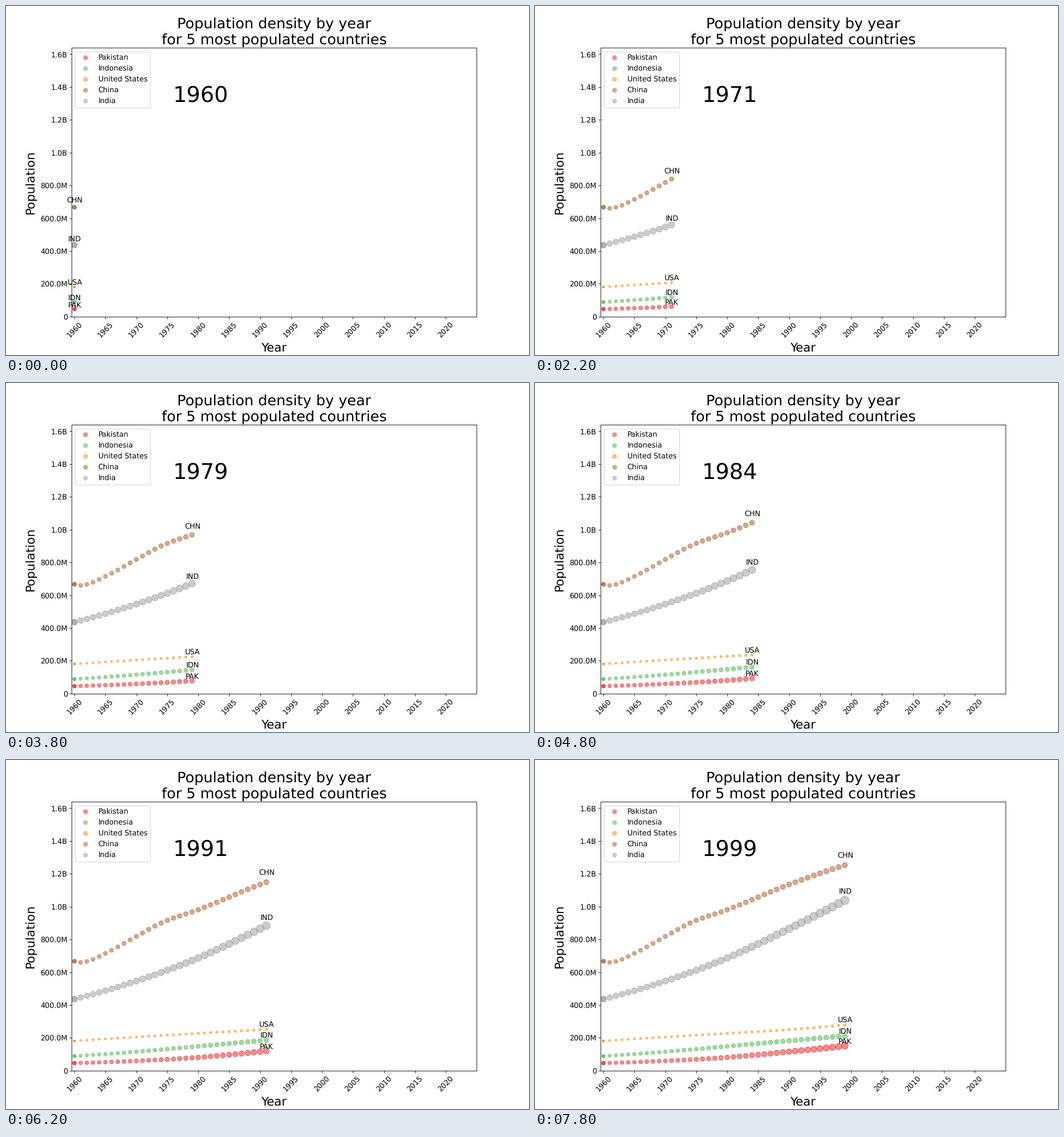
Recreate the animation shown at these times as a matplotlib script. Size 917 by 611 pixels, loop 8 s.

```python
import matplotlib.pyplot as plt
import numpy as np
from matplotlib.animation import FuncAnimation
from matplotlib.lines import Line2D

DPI = 76.4
NUDGE = 1e-4  # keeps float rounding from losing a pixel
YEARS = np.arange(1960, 2000)
AREA_SCALE = 0.6
DECADES = [1960, 1970, 1980, 1990, 1999]

# code: (name, land area in 1000 km2, key years, population in millions)
COUNTRIES = {
    "PAK": ("Pakistan", 771, DECADES, [45.7, 59.3, 80.6, 115.4, 150.3]),
    "IDN": ("Indonesia", 1812, DECADES, [88.4, 115.2, 148.2, 182.2, 211.5]),
    "USA": ("United States", 9147, DECADES, [180.7, 205, 227.2, 249.6, 279]),
    "CHN": ("China", 9388,
            [1960, 1961, 1962, 1965, 1970, 1974, 1980, 1990, 1999],
            [667, 660, 666, 715, 818, 900, 981, 1135, 1253]),
    "IND": ("India", 2973, DECADES, [436, 546, 687, 865, 1038]),
}


def smooth(x, xs, ys):
    """Cubic Hermite curve through the key points."""
    xs, ys = np.array(xs, float), np.array(ys, float)
    slope = np.gradient(ys, xs, edge_order=2)
    i = np.clip(np.searchsorted(xs, x, side="right") - 1, 0, len(xs) - 2)
    h = xs[i + 1] - xs[i]
    t = (x - xs[i]) / h
    u = 1 - t
    return (ys[i] * (1 + 2 * t) * u**2 + ys[i + 1] * (3 - 2 * t) * t**2
            + h * t * u * (slope[i] * u - slope[i + 1] * t))


def short_number(v, _):
    if v >= 1e9:
        return f"{v / 1e9:.1f}B"
    return f"{v / 1e6:.1f}M" if v >= 1e6 else f"{v:.0f}"


plt.rcParams["font.family"] = "DejaVu Sans"
plt.rcParams["text.hinting"] = "no_hinting"
fig, ax = plt.subplots(figsize=((917 + NUDGE) / DPI, (611 + NUDGE) / DPI),
                       dpi=DPI)
ax.set_xlim(1959.5, 2025)
ax.set_ylim(0, 1.6387e9)
ax.set_xticks(range(1960, 2021, 5))
ax.set_yticks(np.arange(9) * 2e8)
ax.yaxis.set_major_formatter(short_number)
ax.tick_params(labelsize=12)
ax.tick_params(axis="x", rotation=45)
ax.tick_params(axis="y", pad=2.9)
ax.set_title("Population density by year\nfor 5 most populated countries",
             fontsize=24)
ax.set_xlabel("Year", fontsize=20, labelpad=5)
ax.set_ylabel("Population", fontsize=20, labelpad=6)

colors = plt.cm.Set1(np.linspace(0, 1, len(COUNTRIES)))
series, handles = [], []
for color, (code, country) in zip(colors, COUNTRIES.items()):
    name, land, key_years, millions = country
    pop = smooth(YEARS, key_years, millions) * 1e6
    sizes = AREA_SCALE * pop / (land * 1000)
    dots = ax.scatter([], [], color=[color], alpha=0.5)
    label = ax.text(1960, 0, code, fontsize=12, ha="center", va="bottom")
    series.append((pop, sizes, dots, label))
    handles.append(Line2D([], [], ls="", marker="o", ms=8, color=color,
                          mec="none", alpha=0.5, label=name))
ax.legend(handles=handles, loc="upper left", fontsize=12)
year_text = ax.text(1980.4, 1.347e9, "", fontsize=36, ha="center", va="center")


def update(i):
    # the first year is plotted twice, so its dots look denser
    shown = np.r_[0, 0:i + 1]
    for pop, sizes, dots, label in series:
        dots.set_offsets(np.c_[YEARS[shown], pop[shown]])
        dots.set_sizes(sizes[shown])
        label.set_position((YEARS[i] + 0.06, pop[i] * 1.03))
    year_text.set_text(str(YEARS[i]))
    return []


anim = FuncAnimation(fig, update, frames=len(YEARS), interval=200, repeat=True)
plt.show()
```
